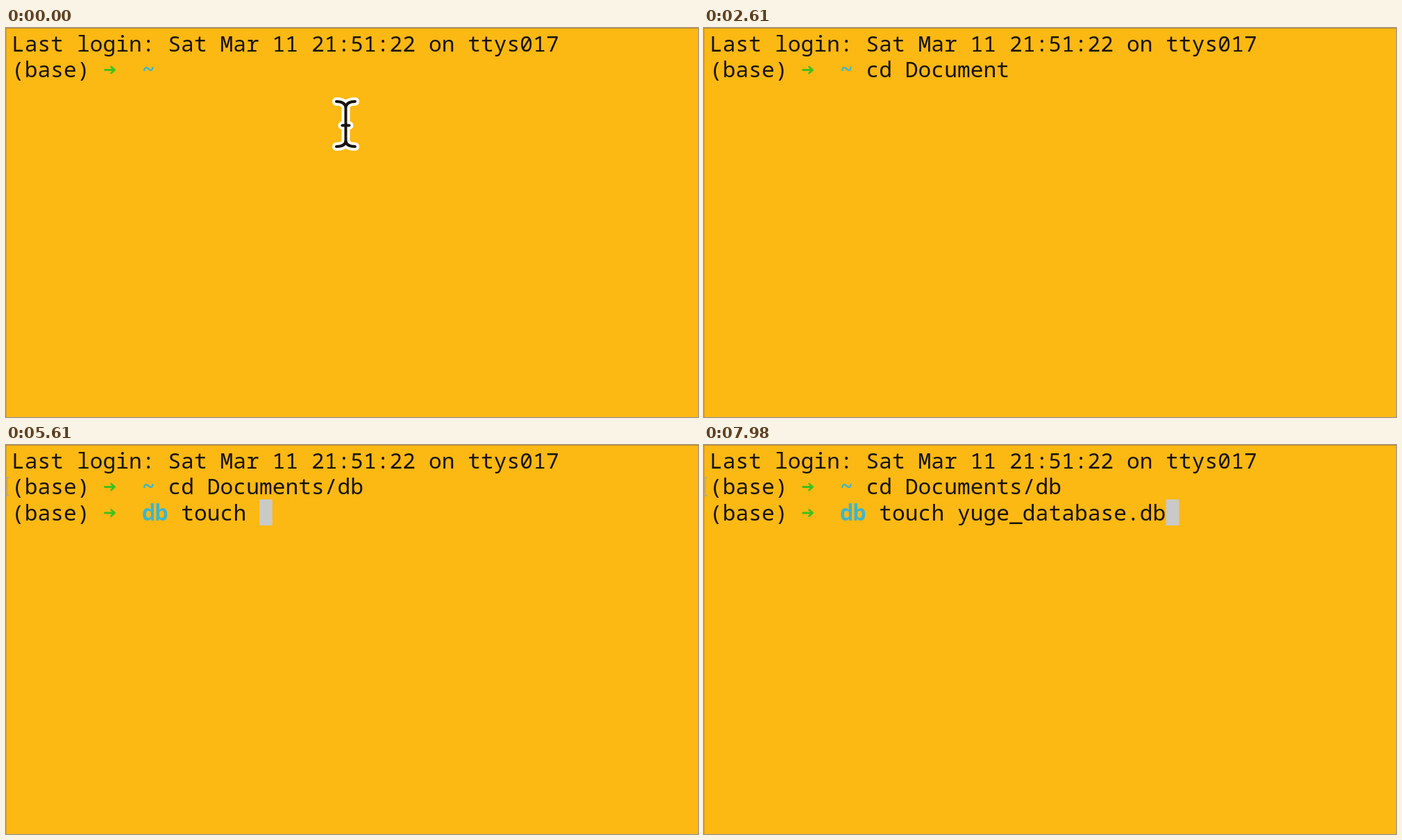
Recreate the animation shown at these times as an HTML page. Size 997 by 561 pixels, loop 8000 ms.

```html
<!DOCTYPE html>
<html lang="en">
<head>
<meta charset="utf-8">
<title>Terminal</title>
<style>
  html, body { margin: 0; width: 100%; height: 100%; overflow: hidden; background: #fcb813; }
  svg { display: block; width: 100vw; height: 100vh; }
  text { font: 31.317px "Noto Sans Mono", "DejaVu Sans Mono", monospace; fill: #17120a; white-space: pre; }
  .dir { font-weight: 700; fill: #3fb5cb; }
  .arrow { fill: none; stroke: #3fc01c; stroke-width: 2.8; stroke-linejoin: round; stroke-linecap: round; }
  .beam { fill: none; stroke-linecap: round; stroke-linejoin: round; }
</style>
</head>
<body>
<svg viewBox="0 0 997 561" preserveAspectRatio="none">
  <defs>
    <path id="arrow" class="arrow" d="M142.5 0H156M151.5 -4.5L156.5 0L151.5 4.5"/>
    <path id="beam" class="beam" d="M476 106Q489.500 106 489.500 116Q489.500 106 503 106M489.500 114V164M476 171Q489.500 171 489.500 162Q489.500 171 503 171M484.500 140.500H494.500"/>
  </defs>
  <rect width="997" height="561" fill="#fcb813"/>
  <path d="M0 .5H997" stroke="#b98c2c"/>
  <path d="M.5 1V561" stroke="#d99f1c"/>

  <text x="8" y="33.500">Last login: Sat Mar 11 21:51:22 on ttys017</text>

  <text x="8" y="71">(base)</text>
  <use href="#arrow" y="60.500"/>
  <text class="dir" x="195.900" y="71">~</text>
  <text id="line0" x="233.480" y="71"></text>

  <g id="second">
    <path d="M4.500 47H1.500V73H4.500" fill="none" stroke="#b9aa80" stroke-width="2"/>
    <text x="8" y="108.500">(base)</text>
    <use href="#arrow" y="98"/>
    <text class="dir" x="195.900" y="108.500">db</text>
    <text id="line1" x="252.270" y="108.500"></text>
  </g>

  <rect id="caret" width="18.800" height="37.500" fill="#c9c9c8"/>
  <g id="mouse">
    <use href="#beam" stroke="#fff" stroke-width="12"/>
    <use href="#beam" stroke="#17120a" stroke-width="4"/>
  </g>
</svg>
<script>
  const LOOP = 8000, CELL = 18.79, LEFT = 8, ENTER = 3600;
  const $ = id => document.getElementById(id);

  // One key time per character.
  const lines = [
    { text: "cd Documents/db", col: 12, top: 41,
      keys: [810, 960, 1290, 1380, 1470, 1560, 1650, 1740, 1800, 1860, 1950, 2760, 2970, 3120, 3360] },
    { text: "touch yuge_database.db", col: 13, top: 78.5,
      keys: [3990, 4200, 4500, 4680, 4920, 5130, 5790, 5970, 6150, 6330,
             6600, 6750, 6840, 6960, 7050, 7170, 7290, 7410, 7500, 7620, 7770, 7890] }
  ];
  const caretOff = [[0, 480], [2430, 2730], [5640, 5760]];

  const show = (id, on) => $(id).setAttribute("visibility", on ? "visible" : "hidden");
  const start = performance.now();

  function draw(now) {
    const t = Math.max(0, now - start) % LOOP;
    const row = t < ENTER ? 0 : 1;

    lines.forEach((line, i) => {
      line.typed = line.keys.filter(k => k <= t).length;
      const text = line.text.slice(0, line.typed);
      const el = $("line" + i);
      if (el.textContent !== text) el.textContent = text;
    });

    const { col, typed, top } = lines[row];
    $("caret").setAttribute("x", LEFT + (col + typed) * CELL);
    $("caret").setAttribute("y", top);
    show("caret", !caretOff.some(([a, b]) => t >= a && t < b));
    show("second", row === 1);
    show("mouse", t < lines[0].keys[0]);
    requestAnimationFrame(draw);
  }
  draw(start);
</script>
</body>
</html>
```
